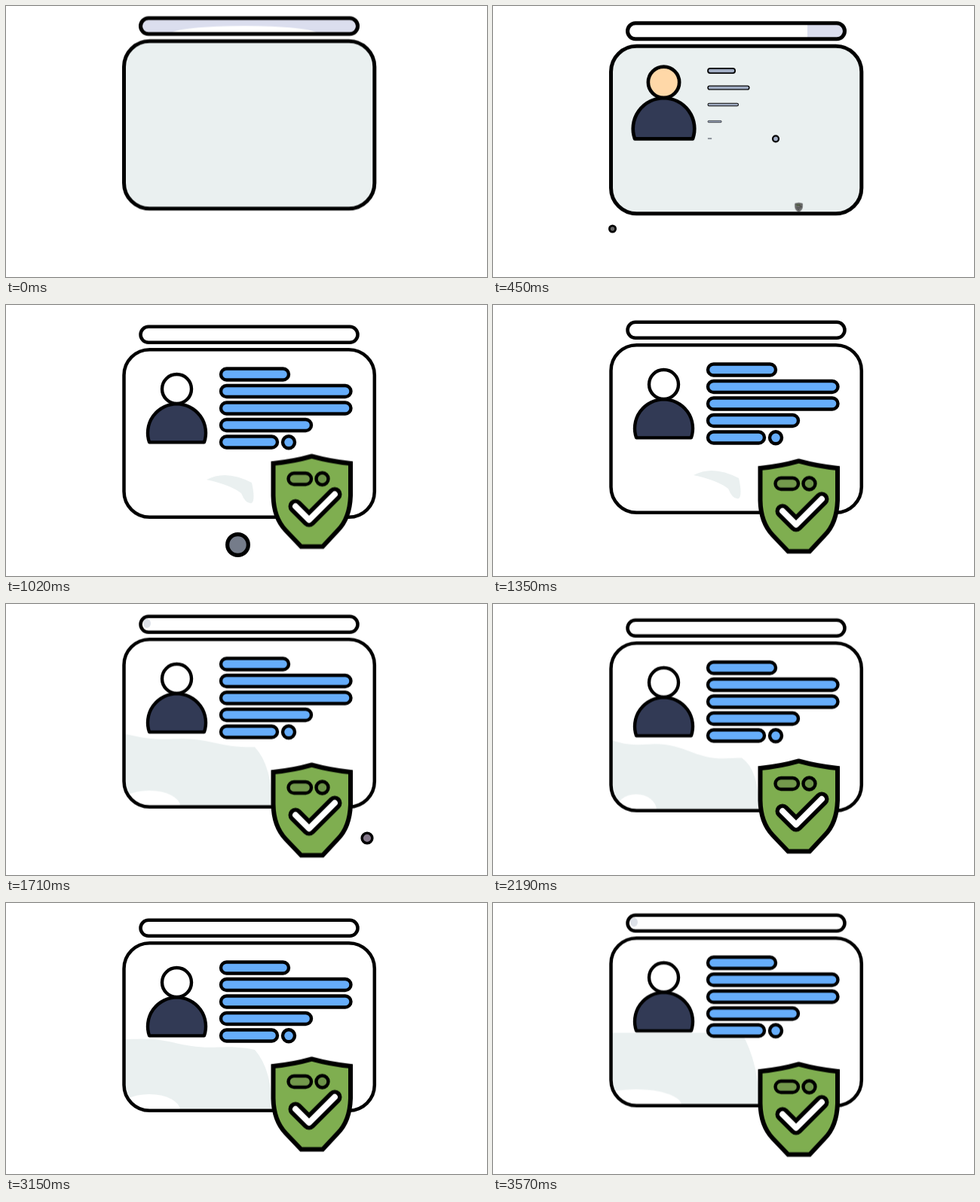
An HTML page for the animation above (3.6 s loop, 638 px wide and 360 px high).

```html
<!DOCTYPE html>
<html lang="en">
<head>
<meta charset="utf-8">
<title>Verified profile card</title>
<style>
  html, body { margin: 0; width: 100%; height: 100%; overflow: hidden; background: #fff; }
  svg { display: block; width: 638px; height: 360px; }
  svg * { stroke-linejoin: round; }
  .ink { stroke: #000; stroke-width: 4.4; fill: none; }

  /* sine-like bobbing, card and badge in opposite directions */
  .bob { animation: bob 900ms cubic-bezier(.3642, 0, .6358, 1) infinite alternate; }
  .bob.up { animation-name: bobUp; }
  @keyframes bob { from { transform: translateY(.4px); } to { transform: translateY(13.6px); } }
  @keyframes bobUp { from { transform: translateY(.6px); } to { transform: translateY(-13.2px); } }

  /* hard cuts between the intro and the settled look */
  .cut { animation: 3600ms step-end infinite; }
  .outline { animation-name: outline; }
  .intro { animation-name: intro; }
  .row { animation-name: row; }
  .badge { animation-name: badge; stroke-width: 6; stroke-linejoin: miter; }
  .skin { animation-name: skin; }
  .swatch { animation-name: swatch; }
  .wash { animation-name: wash; }
  .glint { animation-name: left; fill: #dde1e8; }
  .glint.right { animation-name: right; }
  @keyframes outline { 0% { stroke-width: 5px; } 16.6%, 100% { stroke-width: 4.5px; } }
  @keyframes intro { 0% { opacity: 1; } 16.6%, 100% { opacity: 0; } }
  @keyframes row { 0% { fill: #a3afc6; } 14.5%, 100% { fill: #66adfa; } }
  @keyframes badge { 0% { fill: #777; } 14.5%, 100% { fill: #7fae50; } }
  @keyframes skin { 0% { fill: #ffd8a8; } 16.6%, 100% { fill: #fff; } }
  @keyframes swatch { 0%, 38%, 100% { opacity: 0; } 16.6% { opacity: 1; } }
  @keyframes wash { 0% { opacity: 0; } 38%, 100% { opacity: 1; } }
  @keyframes left { 0%, 53%, 100% { opacity: 0; } 42%, 95% { opacity: 1; } }
  @keyframes right { 0%, 80%, 100% { opacity: 0; } 72% { opacity: 1; } }

  .wipe { animation: wipe 3600ms linear infinite; }
  @keyframes wipe { 12.5%, 100% { transform: translateX(239px); } }
</style>
</head>
<body>
<svg viewBox="0 0 638 360">
  <defs>
    <rect id="card" x="156.5" y="46.2" width="332.3" height="222.6" rx="34"/>
    <rect id="bar" x="178.5" y="15.8" width="288" height="21" rx="10.5"/>
    <path id="tick" d="M384 280L402 298L436 264"/>
    <clipPath id="inCard"><use href="#card"/></clipPath>
    <clipPath id="inBar"><use href="#bar"/></clipPath>
  </defs>

  <g class="bob">
    <g clip-path="url(#inBar)">
      <g class="cut intro">
        <rect class="wipe" x="178" y="14" width="300" height="25" fill="#dbdeee"/>
        <ellipse cx="316" cy="36" rx="96" ry="10" fill="#fff"/>
      </g>
      <ellipse class="cut glint" cx="187" cy="25" rx="5" ry="6"/>
      <ellipse class="cut glint right" cx="455" cy="24" rx="7" ry="4"/>
    </g>
    <use href="#bar" class="ink cut outline"/>

    <g clip-path="url(#inCard)" fill="#eaf0f0">
      <use href="#card" class="cut intro"/>
      <path class="cut swatch" d="M266 219Q292 205 326 223Q331 246 326 250Q318 252 312 237Q298 226 266 219Z"/>
      <g class="cut wash">
        <path id="wave"/>
        <ellipse id="gap" cx="190" cy="268" ry="21" fill="#fff"/>
      </g>
    </g>
    <use href="#card" class="ink cut outline"/>

    <g data-pop="107" data-at="226.5 171">
      <path class="ink" style="fill:#323a55" d="M190.1 169.4A38.5 38.5 0 1 1 262.9 169.4Z"/>
      <circle class="ink cut skin" cx="226.5" cy="98.5" r="19.5"/>
    </g>
    <g id="rows"></g>
    <g data-pop="288" data-at="375 169.3"><circle class="ink cut row" cx="375" cy="169.3" r="8"/></g>
  </g>

  <g id="dots" stroke="#000"></g>

  <g class="bob up">
    <g data-pop="420" data-at="405.5 273.5">
      <path class="ink cut badge"
        d="M354.5 223Q381 220.5 405.5 213.5Q431 220.5 457 223V266Q456 296 440 312L420 333.5H391.5L371 312Q355 295 354.5 266Z"/>
      <g class="ink">
        <rect style="fill:#73994c" x="374.5" y="236" width="30.5" height="15" rx="7.5"/>
        <circle style="fill:#6c9348" cx="419.5" cy="243.5" r="8"/>
      </g>
      <g fill="none" stroke-linecap="round">
        <use href="#tick" stroke="#000" stroke-width="19"/>
        <use href="#tick" stroke="#fff" stroke-width="8"/>
      </g>
    </g>
  </g>
</svg>
<script>
const LOOP = 3600;
const $ = id => document.getElementById(id);

$('rows').innerHTML = [90, 172.5, 172.5, 120, 75].map((width, i) => {
  const y = 79 + i * 22.5;
  return `<g data-pop="${320 + i * 27}" data-at="285 ${y}">` +
    `<rect class="ink cut row" x="285" y="${y - 7.5}" width="${width}" height="15" rx="7.5"/></g>`;
}).join('');

const pops = [...document.querySelectorAll('[data-pop]')].map(el => ({
  el, start: +el.dataset.pop, at: el.dataset.at.split(' ').map(Number)
}));

// bubbles swell and shrink in place, one after another
const DOT_GAP = 760, DOT_SPAN = 540;
const dots = [
  { x: 158.5, y: 296, r: 11, fill: '#666' },
  { x: 307.5, y: 318.5, r: 16.5, fill: '#757c8a' },
  { x: 479, y: 311, r: 9.6, fill: '#84788a' },
  { x: 196, y: 326, r: 17, fill: '#4d678c' }
];
$('dots').innerHTML = dots.map(d => `<circle cx="${d.x}" cy="${d.y}" fill="${d.fill}"/>`).join('');

// grow past full size, then settle
function popScale(age) {
  if (age <= 0) return 0;
  if (age < 345) return 1.065 * age / 345;
  return 1 + 0.065 * Math.max(0, 1 - (age - 345) / 150);
}

// pale wash: a rippled top edge that tilts and levels out again
function drawWash(t) {
  const swing = Math.max(0, Math.sin(Math.PI * (t - 1300) / 2270));
  let d = 'M150 275';
  for (let x = 150; x <= 330; x += 6) {
    const tilt = 31 * swing * (x - 150) / 180;
    const ripple = 4 * swing * Math.sin(x / 18 + t / 500);
    d += `L${x} ${172 + tilt + ripple}`;
  }
  $('wave').setAttribute('d', d + 'Q354 215 353 275Z');
  $('gap').setAttribute('rx', 60 - 35 * swing);
}

function draw(t) {
  for (const { el, start, at: [x, y] } of pops) {
    const s = popScale(t - start);
    el.setAttribute('transform', `translate(${x} ${y}) scale(${s}) translate(${-x} ${-y})`);
    el.setAttribute('visibility', s ? 'visible' : 'hidden');
  }
  dots.forEach((dot, i) => {
    const k = (t - i * DOT_GAP) / DOT_SPAN;
    const r = k > 0 && k < 1 ? dot.r * Math.sin(Math.PI * k) : 0;
    const line = Math.min(r, 1.6 + r * 0.22);
    const el = $('dots').children[i];
    el.setAttribute('r', r - line / 2);
    el.setAttribute('stroke-width', line);
  });
  drawWash(t);
}

let begin;
function frame(now) {
  begin ??= now;
  draw((now - begin) % LOOP);
  requestAnimationFrame(frame);
}
draw(0);
requestAnimationFrame(frame);
</script>
</body>
</html>
```
